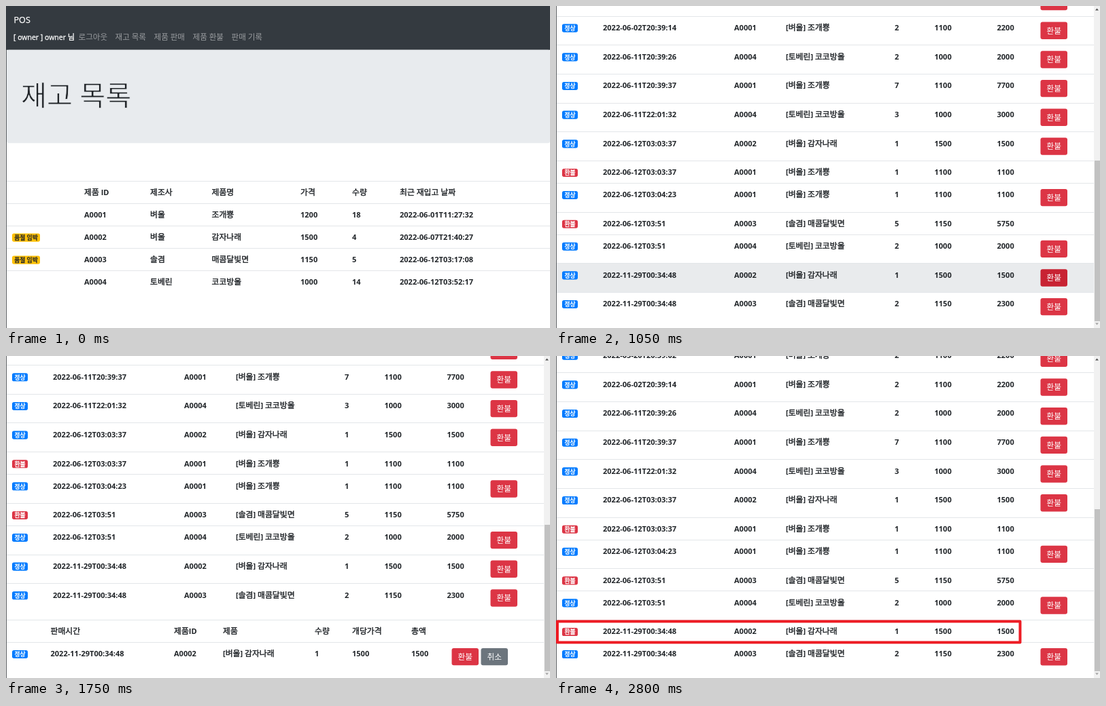
An HTML page with a canvas that plays this animation: 800x475 px, repeating every 3.15 s.

```html
<!DOCTYPE html>
<html lang="ko">
<head>
<meta charset="utf-8">
<title>POS</title>
<style>
html, body { margin: 0; width: 100%; height: 100%; overflow: hidden; background: #fff; }
canvas { display: block; }
</style>
</head>
<body>
<canvas id="stage" width="800" height="475"></canvas>
<script>
const ctx = document.getElementById('stage').getContext('2d');
const STEP = 350, COUNT = 9;
const INK = '#212529', LINE = '#e3e6e9', HOVER = '#e9ebed', MARK = '#ed1c24';
const BLUE = '#007bff', RED = '#dc3545', DARK_RED = '#c82333', GRAY = '#6c757d';
const PANEL = '#e8ebee';
const LATIN = '"Open Sans", "Noto Sans", sans-serif';
const HANGUL = '"Noto Sans CJK KR", "Noto Sans CJK JP", "Noto Sans CJK", sans-serif';
const ROW = 33, TALL = 42.67, TABLE_TOP = 258;

const goods = {
  A0001: ['벼울', '조개뿅', 1200],
  A0002: ['벼울', '감자나래', 1500],
  A0003: ['솔겸', '매콤달빛면', 1150],
  A0004: ['토베린', '코코방울', 1000]
};
const stock = [
  ['A0001', 18, '2022-06-01T11:27:32'],
  ['A0002', 4, '2022-06-07T21:40:27'],
  ['A0003', 5, '2022-06-12T03:17:08'],
  ['A0004', 14, '2022-06-12T03:52:17']
];
// time, product, quantity, unit price, refunded
const sales = [
  ['2021-03-01T19:10:26', 'A0002', 4, 1500],
  ['2022-03-01T19:10:26', 'A0001', 1, 1100],
  ['2022-05-05T19:24:59', 'A0004', 2, 1000, true],
  ['2022-05-20T20:39:02', 'A0001', 2, 1100],
  ['2022-06-02T20:39:14', 'A0001', 2, 1100],
  ['2022-06-11T20:39:26', 'A0004', 2, 1000],
  ['2022-06-11T20:39:37', 'A0001', 7, 1100],
  ['2022-06-11T22:01:32', 'A0004', 3, 1000],
  ['2022-06-12T03:03:37', 'A0002', 1, 1500],
  ['2022-06-12T03:03:37', 'A0001', 1, 1100, true],
  ['2022-06-12T03:04:23', 'A0001', 1, 1100],
  ['2022-06-12T03:51', 'A0003', 5, 1150, true],
  ['2022-06-12T03:51', 'A0004', 2, 1000],
  ['2022-11-29T00:34:48', 'A0002', 1, 1500],
  ['2022-11-29T00:34:48', 'A0003', 2, 1150]
];
const PICK = 13;
const stockCols = [115, 212, 302.5, 433, 509, 579];
const saleCols = [69, 262, 338, 498, 556.5, 648.5];
const pickCols = [65.5, 247, 319, 454, 509, 596];
const saleHead = ['판매시간', '제품ID', '제품', '수량', '개당가격', '총액'];

function rect(x, y, w, h, color) {
  ctx.fillStyle = color;
  ctx.fillRect(x, y, w, h);
}

function pill(x, y, w, h, color, r = 3) {
  ctx.fillStyle = color;
  ctx.beginPath();
  ctx.roundRect(x, y, w, h, r);
  ctx.fill();
}

function mark(x, y, w, h, width) {
  ctx.strokeStyle = MARK;
  ctx.lineWidth = width;
  ctx.strokeRect(x, y, w, h);
}

// Hangul is set slightly larger than Latin so both look the same size.
// Bold Hangul is regular weight with a thin outline.
function runs(str, size, bold) {
  return String(str).match(/[가-힣]+|[^가-힣]+/g).map(part => {
    const ko = /[가-힣]/.test(part);
    const font = ko ? `400 ${size * 1.075}px ${HANGUL}` : `${bold ? 700 : 400} ${size}px ${LATIN}`;
    ctx.font = font;
    return { part, font, outline: ko && bold ? 0.4 : 0, width: ctx.measureText(part).width };
  });
}

// An edge in the text colour thickens the strokes, in the backdrop colour it thins them.
function text(str, x, y, { size = 11.05, bold, color = INK, centered, edge = 0, edgeColor = color } = {}) {
  const list = runs(str, size, bold);
  if (centered) x -= list.reduce((sum, r) => sum + r.width, 0) / 2;
  const base = Math.round(y + size * 0.37);
  ctx.fillStyle = color;
  ctx.strokeStyle = edgeColor;
  ctx.lineJoin = 'round';
  for (const r of list) {
    ctx.font = r.font;
    ctx.fillText(r.part, x, base);
    const width = edge || r.outline;
    if (width) {
      ctx.lineWidth = width;
      ctx.strokeText(r.part, x, base);
    }
    x += r.width;
  }
}

function cells(values, cols, y) {
  values.forEach((v, i) => text(v, cols[i], y, { bold: true }));
}

function badge(label, y, w, fill, color) {
  pill(9, y - 6, w, 12.1, fill, 2.7);
  text(label, 9 + w / 2, y + 0.4, { size: 8.2, bold: true, color, centered: true });
}

function button(label, x, top, color) {
  const y = top + 8.6;
  pill(x, y, 39.5, 25.4, color);
  text(label, x + 19.75, y + 13, { size: 10.9, color: '#fff', centered: true });
}

function rule(y, right) {
  rect(1, Math.floor(y), right - 1, 1, LINE);
}

function header(title, right, hot) {
  rect(0, 0, right, 64.7, '#343a40');
  text('POS', 11.5, 20, { size: 12.6, color: '#fff', edge: 0.25 });
  text('[ owner ] owner 님', 11, 46, { size: 10.5, color: '#fff', edge: 0.3 });
  ['로그아웃', '재고 목록', '제품 판매', '제품 환불', '판매 기록'].forEach((s, i) => {
    const x = i ? 103.5 + 57 * i : 106.5;
    text(s, x, 46, { size: 10.8, color: hot && i === 3 ? '#cdced0' : '#999c9f' });
  });
  pill(1, 64.7, right - 1, 137.6, PANEL, 3.2);
  text(title, 22, 132.5, { size: 38.5, edge: 0.9, edgeColor: PANEL });
}

function stockPage(hot) {
  header('재고 목록', 800, hot);
  rule(TABLE_TOP, 800);
  cells(['제품 ID', '제조사', '제품명', '가격', '수량', '최근 재입고 날짜'], stockCols, 275);
  stock.forEach(([id, qty, date], i) => {
    const top = TABLE_TOP + ROW * (i + 1);
    const [maker, name, price] = goods[id];
    rule(top, 800);
    cells([id, maker, name, price, qty, date], stockCols, top + 17);
    if (qty < 10) badge('품절 임박', top + 17.6, 41, '#ffc107', INK);
  });
  if (hot) mark(270.5, 36.5, 54, 19, 3);
}

function saleRow(sale, cols, top, refunded) {
  const [time, id, qty, price] = sale;
  const [maker, name] = goods[id];
  rule(top, 791);
  cells([time, id, `[${maker}] ${name}`, qty, price, qty * price], cols, top + 17);
  badge(refunded ? '환불' : '정상', top + 17.6, 23, refunded ? RED : BLUE, '#fff');
}

function arrow(y, dir, color) {
  ctx.fillStyle = color;
  ctx.beginPath();
  ctx.moveTo(793, y + dir * 1.5);
  ctx.lineTo(798, y + dir * 1.5);
  ctx.lineTo(795.5, y - dir * 1.5);
  ctx.fill();
}

function scrollbar(top, bottom, scroll) {
  rect(791, 0, 9, 475, '#f1f1f1');
  rect(792, top, 8, bottom - top, '#c1c1c1');
  arrow(5, 1, scroll ? '#505050' : '#a3a3a3');
  arrow(469, -1, scroll ? '#a3a3a3' : '#505050');
}

function salesPage({ scroll = 0, thumb, hover, picked, done }) {
  if (!scroll) header('제품 환불', 791);
  let top = TABLE_TOP - scroll;
  rule(top, 791);
  cells(saleHead, saleCols, top + 17);
  top += ROW;
  sales.forEach((sale, i) => {
    const refunded = sale[4] || (done && i === PICK);
    const h = refunded ? ROW : TALL;
    if (top > -h && top < 475) {
      const hot = hover === 'row' && i === PICK;
      if (hot) rect(1, Math.floor(top), 790, 43, HOVER);
      saleRow(sale, saleCols, top, refunded);
      if (!refunded) button('환불', 712.5, top, hot ? DARK_RED : RED);
    }
    top += h;
  });
  if (picked) {
    top += 10.7;
    rule(top, 791);
    cells(saleHead, pickCols, top + 17);
    top += ROW + 0.3;
    const hot = hover === 'picked';
    if (hot) rect(1, Math.floor(top), 790, 43, HOVER);
    saleRow(sales[PICK], pickCols, top, false);
    button('환불', 655.5, top, hot ? DARK_RED : RED);
    button('취소', 698.5, top, GRAY);
  }
  scrollbar(thumb, scroll ? 465 : 247, scroll);
}

const listEnd = { scroll: 437, thumb: 228, hover: 'row' };
const confirm = { scroll: 523.7, thumb: 249, picked: true };
const refunded = { scroll: 427.3, thumb: 226, done: true };

const scenes = [
  () => stockPage(false),
  () => stockPage(true),
  () => salesPage({ thumb: 10 }),
  () => salesPage(listEnd),
  () => { salesPage(listEnd); mark(710, 385.5, 44.5, 31, 4); },
  () => salesPage(confirm),
  () => { salesPage({ ...confirm, hover: 'picked' }); mark(653.2, 428, 44, 31.5, 4); },
  () => salesPage(refunded),
  () => { salesPage(refunded); mark(2, 391.5, 680.5, 31, 4); }
];

const start = performance.now();
function tick() {
  const time = Math.max(0, performance.now() - start);
  rect(0, 0, 800, 475, '#fff');
  rect(0, 0, 1, 475, '#5c5f62');
  scenes[Math.floor(time / STEP) % COUNT]();
  requestAnimationFrame(tick);
}
tick();
</script>
</body>
</html>
```
